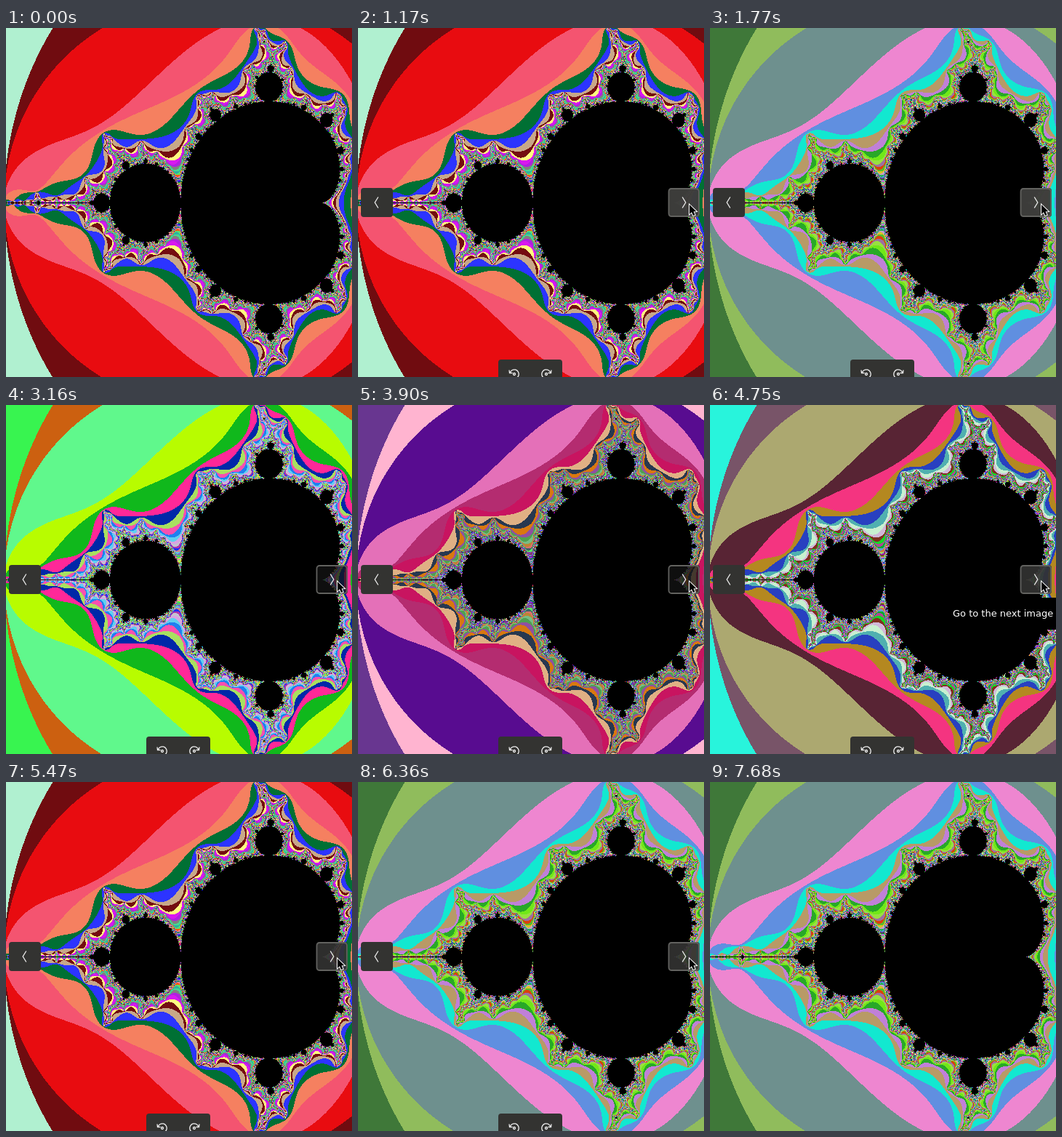
Recreate the animation shown at these times as an HTML page with a canvas. Size 476x480 px, loop 7780 ms.

```html
<!DOCTYPE html>
<html lang="en">
<head>
<meta charset="utf-8">
<title>Mandelbrot palettes</title>
<style>
  html, body { margin: 0; width: 100%; height: 100%; overflow: hidden; background: #000; }
  canvas { display: block; }
</style>
</head>
<body>
<canvas id="stage" width="476" height="480"></canvas>
<script>
const W = 476, H = 480, LOOP = 7780, MAX_ITER = 256;
const ctx = document.getElementById('stage').getContext('2d');

// Colours of the outer escape bands; deeper bands are random.
const PALETTES = [
  'b0f0d0 700c10 e80c10 f45470 f58060 007034 2c34ff c8a888 740c10 fffc80 d818f0 b020e0 808080 48d890 30b0a0 58e070',
  '3f7839 90bc5c 6e908e ee86d0 608fe0 12e8d0 b89a66 c080d8 28a828 70e818 98e040',
  '',
  '38f450 cc6010 60f88c b8fc00 10b81c ff2898 0028a8 a8e060 f850b0 2080f0 60d0f0',
  '683690 ffb4d0 580c90 e470b8 b42c70 c81460 e0b084 283850 d87810 9050a0 50a050',
  '28f4dc 785468 aca870 582434 f43480 b48820 2840c0 50b0b0 c8f0d0 d0b8d8 803020'
];

// Each slide: start time, palette, times at which its button state steps.
const SLIDES = [
  { at: 0, image: 0, steps: [] },
  { at: 1770, image: 1, steps: [1900] },
  { at: 2330, image: 2, steps: [2480, 2610] },
  { at: 3160, image: 3, steps: [3310, 3460] },
  { at: 3900, image: 4, steps: [4050, 4180] },
  { at: 4600, image: 5, steps: [4750, 4900] },
  { at: 5320, image: 0, steps: [5470, 5630] },
  { at: 6210, image: 1, steps: [6360, 6520] }
];
const FILLS = ['rgba(20,20,20,.76)', 'rgba(50,50,49,.92)', 'rgba(62,62,60,.98)'];

function random(seed) {
  return () => {
    seed = (seed * 1664525 + 1013904223) >>> 0;
    return seed / 4294967296;
  };
}

function escapeTime(cx, cy) {
  let x = 0, y = 0, n = 0;
  while (x * x + y * y <= 4 && n < MAX_ITER) {
    const next = x * x - y * y + cx;
    y = 2 * x * y + cy;
    x = next;
    n++;
  }
  return n;
}

const counts = new Uint16Array(W * H);
for (let y = 0; y < H; y++)
  for (let x = 0; x < W; x++)
    counts[y * W + x] = escapeTime((x + 3) / 480 * 2.47 - 2, y / 480 * 2.24 - 1.12);

const images = PALETTES.map((list, i) => {
  const rnd = random(977 * i + 41);
  const bands = list.split(' ').filter(Boolean).map(hex => parseInt(hex, 16));
  const colors = Array.from({ length: MAX_ITER }, (_, n) => bands[n - 1] ?? Math.floor(rnd() * 0x1000000));
  const image = ctx.createImageData(W, H);
  counts.forEach((n, p) => {
    const c = n < MAX_ITER ? colors[n] : 0;
    image.data.set([c >> 16, c >> 8 & 255, c & 255, 255], p * 4);
  });
  return image;
});

function box(x, y, w, h, r, fill) {
  ctx.beginPath();
  ctx.roundRect(x, y, w, h, r);
  ctx.fillStyle = fill;
  ctx.fill();
}

function line(points, color, width) {
  ctx.beginPath();
  points.forEach(p => ctx.lineTo(...p));
  ctx.strokeStyle = color;
  ctx.lineWidth = width;
  ctx.stroke();
}

function ring(radius, from, to) {
  ctx.beginPath();
  ctx.arc(0, 0, radius, from, to);
  ctx.strokeStyle = '#eee';
  ctx.lineWidth = 1.3;
  ctx.stroke();
}

function chevron(x, dir) {
  line([[x - 2.3 * dir, 232.5], [x + 2.3 * dir, 240], [x - 2.3 * dir, 247.5]], '#eee', 1.3);
}

function rotateIcon(x, dir) {
  ctx.save();
  ctx.translate(x, 476);
  ctx.scale(dir, 1);
  ring(6.2, -2.9, 2);
  line([[-7, -5.5], [-6.5, -1.5], [-2.5, -1.5]], '#eee', 1.3);
  ring(1.5, 0, 7);
  ctx.restore();
}

function cursor(x, y) {
  ctx.beginPath();
  [[0, 0], [0, 13], [3, 10.3], [5.2, 15], [7.6, 14], [5.5, 9.4], [9.5, 9.2]]
    .forEach(([dx, dy]) => ctx.lineTo(x + dx, y + dy));
  ctx.closePath();
  ctx.strokeStyle = '#fff';
  ctx.lineWidth = 2;
  ctx.stroke();
  ctx.fillStyle = '#000';
  ctx.fill();
}

function controls(fill, hover) {
  box(4, 220, 44, 40, 4, '#333331');
  chevron(25.5, -1);
  box(427, 220, 43, 40, 4, fill);
  if (hover) {
    ctx.beginPath();
    ctx.roundRect(427.5, 221, 41.5, 38, 4);
    ctx.strokeStyle = '#62625f';
    ctx.lineWidth = 1.8;
    ctx.stroke();
  }
  chevron(448.5, 1);
  box(193, 456, 88, 30, 4, '#333331');
  rotateIcon(215, 1);
  rotateIcon(259, -1);
}

function tooltip() {
  box(324, 265, 156, 44, 4, '#000');
  ctx.font = '13px "DejaVu Sans", sans-serif';
  ctx.fillStyle = '#fff';
  ctx.fillText('Go to the next image', 334, 291);
}

function draw() {
  const t = performance.now() % LOOP;
  const slide = SLIDES.findLast(s => t >= s.at);
  const state = slide.steps.filter(s => t >= s).length;
  ctx.putImageData(images[slide.image], 0, 0);

  const shown = t < 570 ? 0 : Math.min(6, Math.floor((t - 570) / 150) + 1);
  const hidden = t < 7380 ? 0 : Math.min(3, Math.floor((t - 7380) / 150) + 1);
  const alpha = Math.min(1, shown / 4) * (1 - hidden / 3);
  if (alpha > 0) {
    const settled = slide.at <= 1770;
    ctx.globalAlpha = alpha;
    controls(settled ? FILLS[2] : FILLS[state], shown > 2);
    ctx.globalAlpha = 1;
    if (t >= 4750 && t < 5320) tooltip();
    if (!hidden) {
      const away = Math.max(0, 4 - shown);
      cursor(456 + away, 243 + 4 * away);
    }
  }
  requestAnimationFrame(draw);
}
draw();
</script>
</body>
</html>
```
